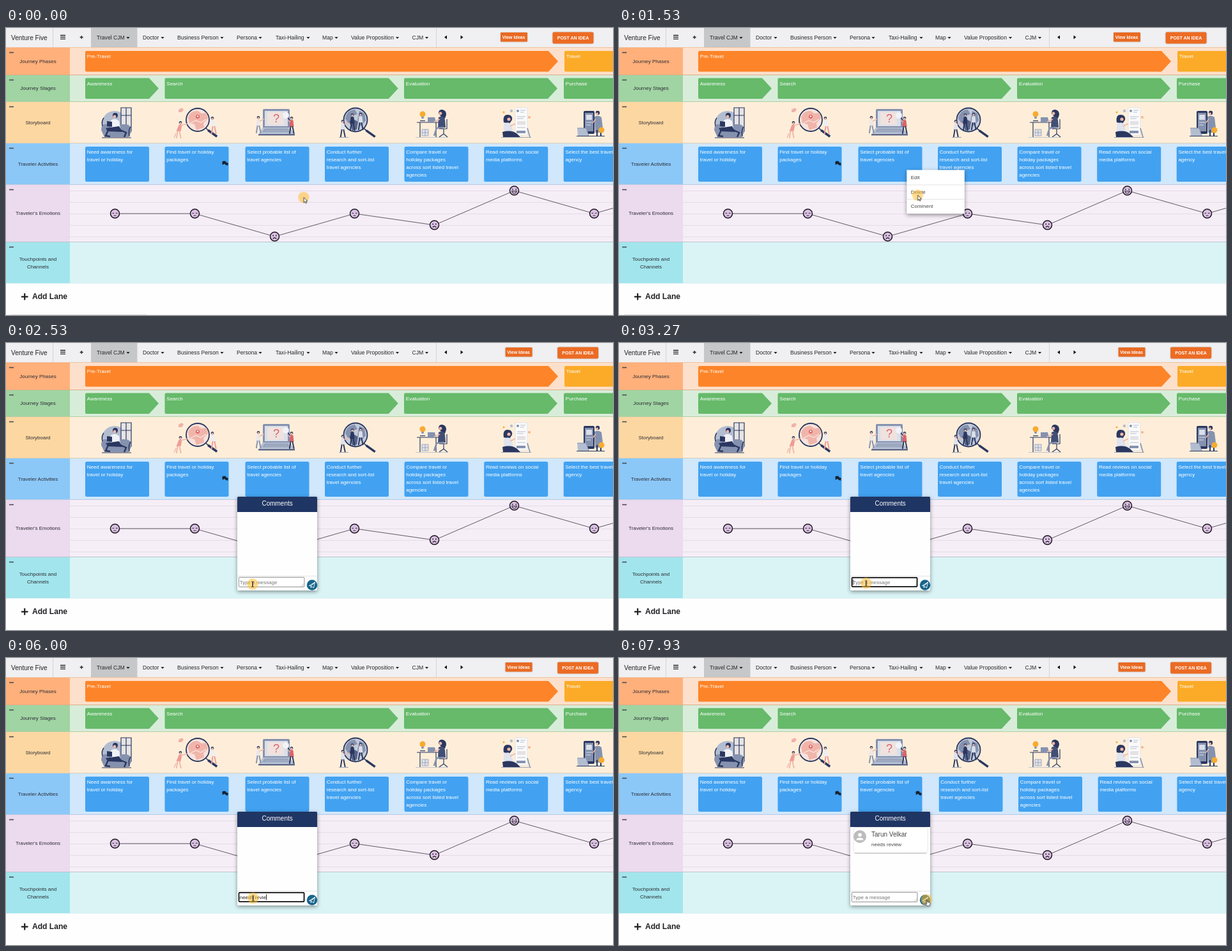
These frames come from a looping animation (950 by 450 pixels, 8000 ms). An HTML page:

```html
<!DOCTYPE html>
<html lang="en">
<head>
<meta charset="utf-8">
<title>Journey map</title>
<style>
html, body { margin: 0; width: 100%; height: 100%; overflow: hidden; background: #fefefe; }
svg { display: block; font: 8px "Liberation Sans", Arial, sans-serif; }
text { white-space: pre; }
.mid { text-anchor: middle; }
.nav { font-size: 8.65px; fill: #26282c; }
.bold { font-weight: bold; }
.white { fill: #fff; }
.btn { font-size: 7px; font-weight: bold; fill: #fff; text-anchor: middle; }
.soft { filter: drop-shadow(0 .5px 1px rgba(0,0,0,.22)); }
.shadow { filter: drop-shadow(0 2px 3px rgba(0,0,0,.42)); }

/* every part shares one 8 s clock; percent = ms / 80 */
#buttons, #scrollbar, #shifted, #lastCard, #menu, #focus, #message, #badge, #arrow, #beam, #hand {
  animation: 8s step-end infinite;
}
#buttons { animation-name: buttons; }
#scrollbar { animation-name: scrollbar; }
#shifted { animation-name: shifted; }
#lastCard { animation-name: lastCard; }
#menu { animation-name: menu; }
#focus { animation-name: focus; }
#message, #badge { animation-name: sent; }
#arrow { animation-name: arrow; }
#beam { animation-name: beam; }
#hand { animation-name: hand; }
#popup { transform-origin: 424.5px 241px; animation: popup 8s linear infinite; }
#cursor { animation: cursor 8s ease-in-out infinite; }
#ring { animation: ring 8s linear infinite; }

@keyframes buttons { 0% { transform: none; } 23.3%, 100% { transform: translateX(7.6px); } }
@keyframes scrollbar { 0% { visibility: visible; } 23.3%, 100% { visibility: hidden; } }
@keyframes shifted { 0% { transform: none; } 92.5%, 100% { transform: translateX(1.5px); } }
@keyframes lastCard { 0% { transform: none; } 92.5%, 100% { transform: translateX(.7px); } }
@keyframes menu { 0% { visibility: hidden; } 12.5% { visibility: visible; } 23%, 100% { visibility: hidden; } }
@keyframes focus { 0% { visibility: hidden; } 35% { visibility: visible; } 91.5%, 100% { visibility: hidden; } }
@keyframes sent { 0% { visibility: hidden; } 92.5%, 100% { visibility: visible; } }
@keyframes arrow { 0% { visibility: visible; } 29.5%, 100% { visibility: hidden; } }
@keyframes beam { 0% { visibility: hidden; } 29.5% { visibility: visible; } 87.2%, 100% { visibility: hidden; } }
@keyframes hand { 0% { visibility: hidden; } 87.2%, 100% { visibility: visible; } }
@keyframes popup {
  0%, 23.2% { opacity: 0; transform: scale(.887, .79); }
  24.125% { opacity: .49; transform: scale(.94, .89); }
  26%, 100% { opacity: 1; transform: none; }
}
@keyframes cursor {
  0%, 3.3% { transform: translate(465.8px, 265.5px); }
  11%, 14.1% { transform: translate(450.4px, 222.6px); }
  22%, 25.2% { transform: translate(473.8px, 276.8px); }
  31%, 33.5% { transform: translate(386px, 378px); }
  36%, 83.3% { transform: translate(386.7px, 376.5px); }
  88.8%, 91% { transform: translate(479.3px, 379px); }
  97%, 100% { transform: translate(481.2px, 379px); }
}
@keyframes ring {
  0%, 22.6% { opacity: 0; } 23%, 24.4% { opacity: .8; } 25%, 34.2% { opacity: 0; }
  34.7%, 35.8% { opacity: .8; } 36.5%, 90.4% { opacity: 0; }
  90.9%, 92% { opacity: .8; } 92.8%, 100% { opacity: 0; }
}
</style>
</head>
<body>
<svg width="950" height="450" viewBox="0 0 950 450">
  <g id="nav"></g>
  <g id="buttons">
    <g class="soft"><rect x="774" y="7" width="42" height="14.5" rx="1" fill="#e96a22"/><rect x="855.5" y="6.5" width="64" height="18" rx="2" fill="#ec6b23"/></g>
    <text class="btn" x="794.5" y="16.7">View Ideas</text><text class="btn" x="887.5" y="18">POST AN IDEA</text>
  </g>
  <g id="lanes"></g>
  <g id="steps"></g>
  <g id="art"></g>
  <g id="cards"></g>
  <g id="mood"></g>
  <path d="M24 421.3h10.5M29.2 416v10.5" stroke="#202124" stroke-width="2.2"/>
  <text class="bold" x="41" y="425.3" font-size="12.1" fill="#202124">Add Lane</text>
  <g id="scrollbar"><rect y="449" width="950" height="1" fill="#f3f3f3"/><rect x="8" y="449" width="212" height="1" fill="#dadada"/></g>

  <g id="menu">
    <rect class="shadow" x="450.3" y="222.6" width="90.5" height="68.6" fill="#fff"/>
    <path d="M450.3 246h90.5M450.3 268.5h90.5" stroke="#ddd" stroke-width=".8"/>
    <g fill="#444"><text x="456.7" y="237">Edit</text><text x="456.7" y="259.7">Delete</text><text x="456.7" y="282.2">Comment</text></g>
  </g>

  <g id="popup">
    <rect class="shadow" x="362" y="241" width="125" height="147" rx="1.5" fill="#fefefe"/>
    <path d="M362 265v-22.5q0-1.5 1.5-1.5h122q1.5 0 1.5 1.5V265z" fill="#1f3563"/>
    <text class="mid white" x="424.6" y="254.8" font-size="10">Comments</text>
    <g id="message">
      <rect x="367" y="265.5" width="116" height="40.5" rx="3" fill="#fff" stroke="#e2e2e2" stroke-width=".8"/>
      <path d="M369 306h112" stroke="#aaa" stroke-width=".9"/>
      <circle cx="377" cy="280" r="10" fill="#bdbdbd"/>
      <circle cx="377" cy="277.3" r="2.8" fill="#fff"/><path d="M371.5 285.5c0-5 11-5 11 0z" fill="#fff"/>
      <text x="395" y="279.5" font-size="10" fill="#444">Tarun Velkar</text>
      <text x="395" y="294.7" fill="#444">needs review</text>
    </g>
    <path d="M362 365.5h125" stroke="#ddd" stroke-width=".8"/>
    <rect x="364.4" y="367.4" width="102.5" height="15" rx="1" fill="#fff" stroke="#858585" stroke-width=".9"/>
    <path d="M462 381.5l4-4M464.3 381.5l1.7-1.7" stroke="#999" stroke-width=".6"/>
    <rect id="focus" x="364.5" y="367.8" width="102" height="14.4" rx="1.5" fill="none" stroke="#101010" stroke-width="1.7"/>
    <text id="hint" x="365.7" y="377.5" fill="#757575">Type a message</text>
    <text id="typed" x="365.7" y="377.5" fill="#222"></text>
    <rect id="caret" y="370.5" width=".9" height="9" fill="#111"/>
    <circle cx="479" cy="379.5" r="8.2" fill="#17658c"/>
    <path d="M474.5 380.5l9-5.5-2 9-3-2.2-1.3 2v-3l6.3-5.8-6.3 5.8z" fill="none" stroke="#fff" stroke-width=".9" stroke-linejoin="round"/>
  </g>

  <g id="cursor">
    <circle r="8.7" fill="#ffbe32" opacity=".55"/>
    <circle id="ring" r="3.8" fill="#ffc06a" stroke="#f79a4c" stroke-width="1.6"/>
    <path id="arrow" d="M.2 0v8.3l1.9-1.7 1.2 2.8 1.4-.6-1.2-2.7h2.5z" fill="#fff" stroke="#222" stroke-width=".8"/>
    <path id="beam" d="M-1.8-4q1.8 0 1.8 1v6.5q0 1-1.8 1M1.8-4q-1.8 0-1.8 1v6.5q0 1 1.8 1" fill="none" stroke="#222" stroke-width=".9"/>
    <path id="hand" d="M.3.5q.8-1 1.5 0v3l3.5 1q.8.4.5 2l-.8 3.5H1L-1.5 6.5q.6-1.5 1.8 0z" fill="#fff" stroke="#222" stroke-width=".8"/>
  </g>
</svg>
<script>
const $ = id => document.getElementById(id);
const NAVY = '#2b3760', SLATE = '#8592af', MIST = '#b3bdd0', PALE = '#dadfe9', SKIN = '#efb8aa', RED = '#dc6468', AMBER = '#f6ab30';

const label = (x, y, s, cls = '') => `<text x="${x}" y="${y}" class="${cls}">${s}</text>`;
const shape = (d, fill) => `<path d="${d}" fill="${fill}"/>`;
const line = (d, color, w = 1) => `<path d="${d}" fill="none" stroke="${color}" stroke-width="${w}"/>`;
const dot = (x, y, r, fill) => `<circle cx="${x}" cy="${y}" r="${r}" fill="${fill}"/>`;
const box = (x, y, w, h, fill, r = 0) => `<rect x="${x}" y="${y}" width="${w}" height="${h}" rx="${r}" fill="${fill}"/>`;

// Navigation bar
const tabs = [['Travel CJM', 142, 191], ['Doctor', 214, 245], ['Business Person', 268, 338], ['Persona', 361, 398],
  ['Taxi-Hailing', 422, 473], ['Map', 495, 517], ['Value Proposition', 540, 612.5], ['CJM', 635.5, 658.5]];
$('nav').innerHTML = box(0, 0, 950, 30, '#f0f0f2') + box(133, 0, 72.5, 30, '#c5c7c9')
  + line('M73.5 0v30M673.5 0v30', '#d4d4d8')
  + '<text x="8" y="18.5" font-size="10.1" fill="#222">Venture Five</text>'
  + line('M85 11.5h8M85 14.3h8M85 17.1h8', '#222', 1.3) + line('M115.7 14.5h5M118.2 12v5', '#222', 1.3)
  + tabs.map(([s, x, cx]) => label(x, 17.8, s, 'nav') + shape(`M${cx - 2.6} 14h5.2l-2.6 3z`, '#222')).join('')
  + shape('M690 11.5v6l-4-3z', '#111') + shape('M711.5 11.5v6l4-3z', '#111');

// Lanes: top, bottom, label tint, body tint, edge, title lines
const lanes = [
  [30, 73, '#ffb07b', '#fde0cb', '#dcae88', 'Journey Phases'],
  [73, 115, '#a0d4a3', '#d8edd9', '#b4cfa6', 'Journey Stages'],
  [115, 180, '#fdd7a1', '#feeed9', '#d8cdb8', 'Storyboard'],
  [180, 245, '#8bc8f8', '#d0e7fc', '#b9cbe0', 'Traveler Activities'],
  [245, 335, '#ecdaee', '#f6eef7', '#bcc4d0', 'Traveler\'s Emotions'],
  [335, 400, '#a2e5ed', '#daf4f6', '#e2f2f3', 'Touchpoints and', 'Channels']];
$('lanes').innerHTML = lanes.map(([top, end, tint, body, edge, ...title]) => {
  const mid = (top + end) / 2 + 3 - (title.length - 1) * 6;
  return box(0, top, 100, end - top, tint) + box(100, top, 850, end - top, body)
    + line(`M5 ${top + 8.5}h7`, '#4b4b52', 1.6)
    + `<g fill="#2c2c34">${title.map((s, i) => label(50, mid + i * 12, s, 'mid')).join('')}</g>`;
}).join('') + lanes.map(([, end, , , edge]) => line(`M0 ${end + .5}h950`, edge)).join('') + line('M0 30.5h950', '#efc3a2');

// Chevron bars
const bar = (x, end, y, h, fill, s) =>
  shape(`M${x + 2} ${y}H${end - 15}l15 ${h / 2}l-15 ${h / 2}H${x + 2}q-2 0-2-2v${4 - h}q0-2 2-2z`, fill)
  + label(x + 2.8, y + 11, s, 'white');
$('steps').innerHTML = bar(124, 864, 36, 32.5, '#fd8428', 'Pre-Travel') + bar(874, 1100, 36, 32.5, '#fbab28', 'Travel')
  + [[124, 239, 'Awareness'], [248.5, 613.8, 'Search'], [623, 863, 'Evaluation'], [873, 1100, 'Purchase']]
    .map(([x, end, s]) => bar(x, end, 78.5, 32.5, '#66ba6a', s)).join('');

// Storyboard scenes
const person = (x, y, top, legs, lean = 0) => dot(x + lean, y - .8, 2.3, NAVY) + dot(x + lean, y, 1.6, SKIN)
  + shape(`M${x - 2.5 + lean} ${y + 3}q2.5-2 5 0l${1 - lean} 10h-7z`, top)
  + line(`M${x - 1.3} ${y + 12}l-2 12M${x + 1.3} ${y + 12}l2.5 12`, legs, 1.9);
const lens = (x, y, r, fill) => `<circle cx="${x}" cy="${y}" r="${r}" fill="${fill}" stroke="${NAVY}" stroke-width="1.8"/>`
  + line(`M${x + r * .72} ${y + r * .72}l4 4`, NAVY, 1.6) + line(`M${x + r * .9} ${y + r * .9}l14 10`, NAVY, 3.6);
const scenes = [
  // reader by the window
  dot(170, 150, 20, MIST) + box(180, 125, 16, 32, '#e6e4e3') + line('M180 125h16v37h-16zM188 125v37M180 137h16', NAVY, 1.2)
  + shape('M149 160q0-11 10-9h27q11 0 10 12l-4 8h-38z', SLATE) + line('M150 172h46', NAVY, 1.2)
  + dot(171, 137, 4, NAVY) + dot(170, 139, 2.4, SKIN) + shape('M164 145q7-5 13 1l2 12h-15z', '#f1f2f7')
  + shape('M177 154l-21 3 3 5 23 1z', NAVY) + line('M160 160l-4 9 7 1M179 160l9 4-3 7', NAVY, 2.4)
  + shape('M158 146l8 1v8l-8-1z', NAVY) + line('M151 154q-2-8 2-13M193 170q-2-10 2-15', NAVY, 1.5),
  // searching with a large magnifier
  lens(300, 144, 18, '#f6e3dc') + shape('M285 140q4-11 15-10l6 4 8-1 2 9-7 7 1 7-12 4-3-9-8-2z', '#f0b5aa')
  + dot(300, 139, 3, RED) + dot(300, 138.5, 1.2, '#fff') + line('M289 149l8-4 8 3 8-5', '#fbe6df', 1.2)
  + person(270, 149, '#ee9b96', SKIN, 3) + line('M273 153l11-3M266 165l-3 7', SKIN, 1.4)
  + person(325, 142, '#eceef4', '#ee9b96', -2) + shape('M270 128q6-5 8 0l-3 4h-5z', '#f1b2a9'),
  // question on a laptop
  shape('M404 127h38q2 0 2 2v27h-42v-27q0-2 2-2z', SLATE) + box(405, 130, 36, 24, PALE) + box(409, 132, 26, 20, '#efe2df')
  + dot(438, 137, 5, '#f1f3f8') + line('M441 141l4 4', NAVY, 1.2)
  + `<text x="423" y="148" class="mid" font-size="18" fill="${RED}">?</text>`
  + shape('M402 156h42l8 11h-57z', MIST) + shape('M405 158h36l3 5h-42z', SLATE) + line('M395 167.5h57', NAVY, 1.5)
  + line('M405 159.7h36M404 161.7h39', PALE, .6)
  + person(395, 141, '#ece7e8', SLATE) + person(447, 142, RED, NAVY) + line('M397 146l7-3M445 147l-5-3', SKIN, 1.4),
  // group under the lens
  lens(547, 144, 18.5, '#c3cbd9') + shape('M531 142q2-13 15-14l4 7-8 3 2 9-8 3zM553 130l8 4 2 11-8 9-5-9z', SLATE)
  + shape('M537 146l7-3 7 4-2 12-7 2z', '#566487') + person(542, 137, NAVY, NAVY) + person(555, 136, PALE, NAVY)
  + person(527, 147, '#dfe3ec', NAVY) + line('M530 151l8-2', SKIN, 1.4) + line('M521 171.5h15', SLATE, .8),
  // working at a desk
  dot(652, 135, 4.5, AMBER) + box(650.3, 139, 3.4, 3, SLATE) + line('M648 145.5h8', NAVY, 1.2)
  + line('M643 148h35M648 148v23M673 148v23', NAVY, 1.2) + shape('M660 140h11l2 8h-13z', SLATE)
  + shape('M677 134q0-7 6-6t6 8l-2 6-6-3z', NAVY) + dot(680, 134, 2.4, SKIN) + shape('M677 140q8-4 10 4l1 12h-12z', '#414e76')
  + line('M679 143l-9 4', SKIN, 1.4) + line('M685 156l-11 1-4 12', SLATE, 2.6) + line('M690 143v15h-12M685 158v8M678 171l7-5 6 5', NAVY, 1.2)
  + box(651, 159, 10, 10, '#dfe1e7') + line('M651 159h10v10h-10zM651 164h10M656 159v10', SLATE, .7) + line('M641 171.5h51', MIST, .8),
  // reading posts
  box(797, 125, 19, 43, '#fbfaf9', 2) + line('M797 125h19v43h-19z', PALE, .8) + dot(801, 130, 2, SLATE)
  + line('M805 129h8M805 132h6M800 139h13M800 142h10M800 156h13', MIST, 1) + box(800, 146, 13, 6, '#e4e2e5') + box(799, 161, 14, 4, SLATE)
  + shape('M779 148q-2-12 6-12t7 8l-4 6z', NAVY) + dot(787, 143, 2.6, SKIN) + shape('M779 150q8-4 12 1l3 13h-15z', '#dfe4ef')
  + shape('M777 163q14-4 23 3l5 5h-27z', NAVY) + line('M789 154l8-4', SKIN, 1.6) + dot(791, 130, 2.2, MIST) + dot(779, 132, 1.5, AMBER)
  + dot(819, 140, 2, '#f4b58e') + line('M816 157l4 14', SLATE, 1.6) + line('M775 171.5h47', SLATE, .8),
  // choosing on a phone
  box(904, 130, 17, 36, NAVY, 2) + box(906, 133, 13, 29, SLATE) + box(908, 136, 9, 8, PALE) + line('M908 148h9M908 152h7', PALE, 1)
  + shape('M894 157h14l4 12h-17z', MIST) + line('M894 157h14l4 12', SLATE, 1) + dot(926, 133, 3.2, NAVY) + dot(925, 134.3, 1.9, SKIN)
  + shape('M921 139q6-3 11 1l3 24h-13z', SLATE) + line('M923 143l-5 6', SKIN, 1.5) + line('M925 160v9M931 160v9', NAVY, 2)
  + dot(932, 160, 4.5, AMBER) + line('M893 169.5h44', NAVY, 1.2)];
$('art').innerHTML = scenes.join('');

// Activity cards
const bubbles = x => `<g fill="#17222f"><ellipse cx="${x - 1.5}" cy="210.8" rx="3.1" ry="2.4"/><path d="M${x - 4} 211.5l-.6 3 3-1z"/>`
  + `<ellipse cx="${x + 2.2}" cy="213" rx="2.6" ry="2.1"/><path d="M${x + 3} 214l2 2-3.5-1z"/></g>`;
const card = (x, ...rows) => box(x, 186, 100, 55, '#42a2f1', 2.5) + rows.map((s, i) => label(x + 2.7, 197 + i * 12, s, 'white')).join('');
$('cards').innerHTML = card(124, 'Need awareness for', 'travel or holiday') + card(248.5, 'Find travel or holiday', 'packages')
  + bubbles(343) + card(374.5, 'Select probable list of', 'travel agencies') + `<g id="badge">${bubbles(469)}</g><g id="shifted">`
  + card(499, 'Conduct further', 'research and sort-list', 'travel agencies')
  + card(623.5, 'Compare travel or', 'holiday packages', 'across sort listed travel', 'agencies')
  + card(748.2, 'Read reviews on social', 'media platforms') + '</g><g id="lastCard">'
  + card(872.7, 'Select the best travel', 'agency') + '</g>';

// Emotion curve: one point every 125 px, 18 px per level
const INK = '#1d1622';
const faces = {
  calm: line('M-4-.6h2.6M1.4-.6H4M-1.8 3.2h3.6', INK, .9),
  sad: dot(-2.3, -1.5, .9, INK) + dot(2.3, -1.5, .9, INK) + line('M-2.8 3.6q2.8-3.4 5.6 0', INK, 1.1),
  glad: line('M-3.8-3l2 1.2-2 1.2M3.8-3l-2 1.2 2 1.2', INK, .8) + line('M-3.8 .9h7.6q-.6 3.4-3.8 3.4t-3.8-3.4z', INK, 1)
};
const moods = [[2, 'calm'], [2, 'calm'], [4, 'sad'], [2, 'calm'], [3, 'sad'], [0, 'glad'], [2, 'calm'], [0, 'glad']];
const spots = moods.map(([level, face], i) => [170.5 + i * 125, 255 + level * 18, face]);
$('mood').innerHTML = [0, 1, 2, 3, 4].map(i => line(`M100 ${255.5 + i * 18}h850`, '#e2d8e4', .9)).join('')
  + line('M' + spots.map(([x, y]) => `${x} ${y}`).join('L'), '#39343d', .8)
  + spots.map(([x, y, face]) => `<g transform="translate(${x} ${y})"><circle r="7" fill="#d9c0e0" stroke="${INK}" stroke-width="1.5"/>${faces[face]}</g>`).join('');

// Typing and caret
const LOOP = 8000, FOCUS = 2800, SEND = 7400, note = 'needs review';
const keys = [3880, 4470, 4530, 4600, 4800, 4930, 5400, 5470, 5670, 5800, 5930, 6030];
let start;
function draw(now) {
  start ??= now;
  const t = (now - start) % LOOP;
  const count = t < SEND ? keys.filter(k => k <= t).length : 0;
  $('typed').textContent = note.slice(0, count);
  $('hint').style.display = count ? 'none' : '';
  const last = count ? keys[count - 1] : FOCUS;
  const lit = t >= FOCUS && t < SEND && (t - last) % 1000 < 500;
  $('caret').style.display = lit ? '' : 'none';
  $('caret').setAttribute('x', 365.7 + (count ? $('typed').getComputedTextLength() : 0));
  requestAnimationFrame(draw);
}
requestAnimationFrame(draw);
</script>
</body>
</html>
```
